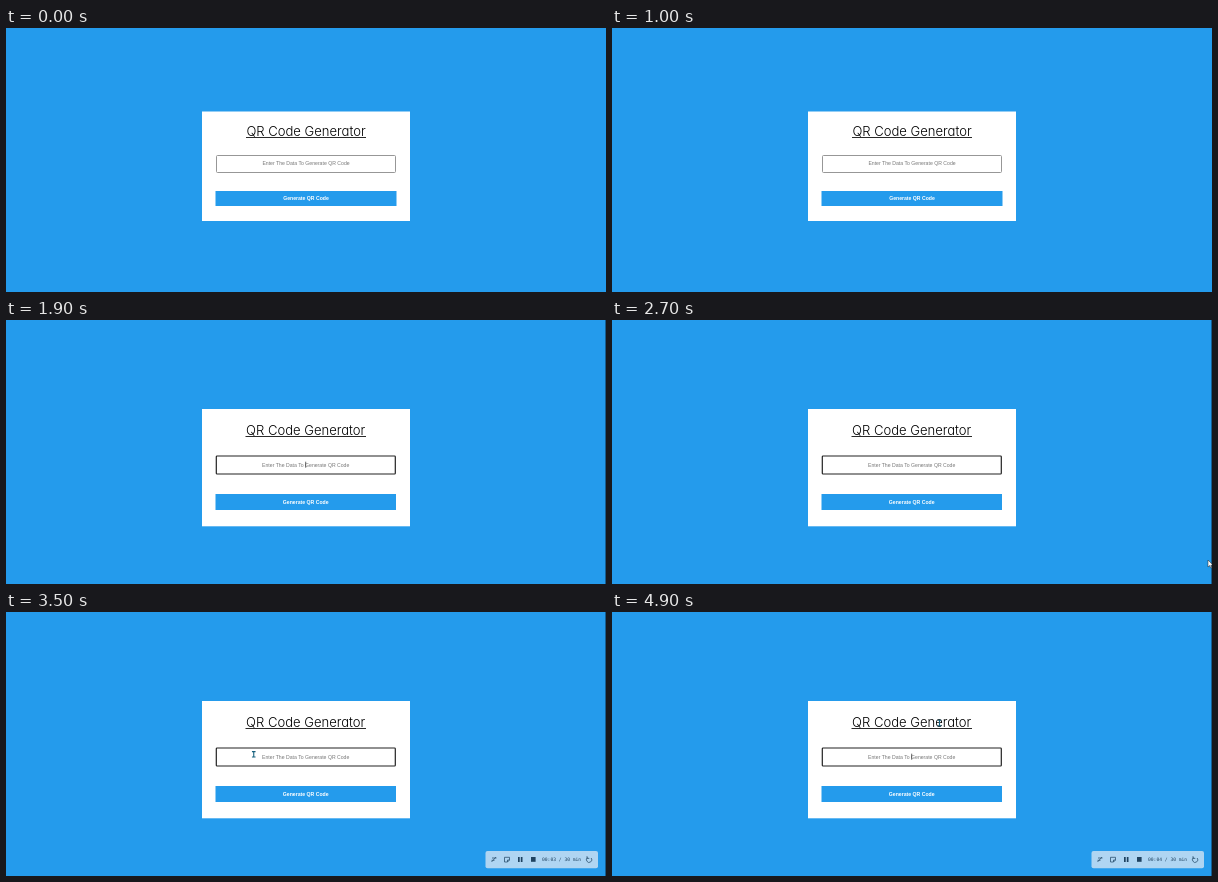
Write an HTML page that moves like this. It is 600 px wide and 264 px high and loops after 5000 ms.

```html
<!DOCTYPE html>
<html lang="en">
<head>
<meta charset="utf-8">
<title>QR Code Generator</title>
<style>
  html, body { margin: 0; width: 100%; height: 100%; overflow: hidden; background: #249bec; }
  svg { display: block; width: 600px; height: 264px; }
  text { text-anchor: middle; font: 5.15px "Liberation Sans", Arial, sans-serif; }
  .title { font: 300 13.05px Inter, sans-serif; font-feature-settings: "cv11"; }
  .hint { fill: #777; }
  .label { fill: #fff; font-weight: bold; }
  .clock { font: 4.65px "DejaVu Sans Mono", monospace; fill: #1f4260; }
  .icon { fill: none; stroke: #2d5270; stroke-width: .8; }
  .solid { fill: #1f4260; }
</style>
</head>
<body>
<svg viewBox="0 0 600 264">
  <rect width="600" height="264" fill="#249bec"/>

  <g id="idle">
    <rect x="196" y="83.5" width="208" height="109.5" fill="#fff"/>
    <text class="title" x="300" y="108">QR Code Generator</text>
    <path d="M240 109.5H360" stroke="#111" stroke-width=".9"/>
    <rect x="210.5" y="127.5" width="179" height="17" rx="1" fill="#fff" stroke="#8c8c8c" stroke-width=".9"/>
    <text class="hint" x="300" y="137.4">Enter The Data To Generate QR Code</text>
    <rect x="209.5" y="163" width="181" height="15" fill="#249bec"/>
    <text class="label" x="300" y="172">Generate QR Code</text>
  </g>

  <g id="focused">
    <rect x="196" y="89" width="208" height="117.3" fill="#fff"/>
    <text class="title" x="299.7" y="115">QR Code Generator</text>
    <path d="M239.5 116.5H360" stroke="#111" stroke-width=".9"/>
    <rect x="210.3" y="136" width="179" height="18" rx=".8" fill="#fff" stroke="#222" stroke-width="1.2"/>
    <text class="hint" x="299.7" y="146.7">Enter The Data To Generate QR Code</text>
    <path id="caret" d="M299.7 141.7V147.7" stroke="#222" stroke-width=".7"/>
    <rect x="209.5" y="174" width="180.5" height="16" fill="#249bec"/>
    <text class="label" x="299.7" y="183.7">Generate QR Code</text>
    <path d="M599.6 0V264" stroke="#12476e" stroke-width=".8"/>
  </g>

  <g id="recorder">
    <rect x="479.5" y="239" width="112.5" height="17.2" rx="2" fill="#afd5f2"/>
    <path class="icon" d="M485.5 250L490 245M486 246H490.5M485.5 248.3H488.5"/>
    <path class="icon" d="M498.5 245.3H503.5V248L501.5 250H498.5ZM501.5 250V248H503.5"/>
    <path class="solid" d="M512 245h1.7v5H512ZM514.8 245h1.7v5h-1.7Z"/>
    <rect class="solid" x="525" y="245" width="4.6" height="4.8"/>
    <text id="clock" class="clock" x="555.6" y="249.3"></text>
    <path class="icon" d="M581.7 245.4A2.7 2.7 0 1 0 585.2 246M581 244.2V246.4H583.3"/>
  </g>

  <g id="pointer">
    <path id="beam" d="M-1.8 -2.7H1.8M0 -2.7V2.7M-1.8 2.7H1.8" fill="none" stroke="#17617e" stroke-width="1.1"/>
    <path id="arrow" d="M0 0V7L1.7 5.5L2.8 8L3.8 7.5L2.8 5.2H5Z" fill="#fff" stroke="#222" stroke-width=".5"/>
  </g>
</svg>
<script>
const LOOP = 5000, STEP = 100;
const el = id => document.getElementById(id);
const show = (id, on) => el(id).style.display = on ? "" : "none";

// Pointer path: [ms, x, y]
const path = [
  [2700, 596, 240], [3000, 400, 172], [3300, 251.5, 139], [3700, 244, 145.7],
  [4000, 244, 145.7], [4400, 415, -12], [4700, 415, -12], [4800, 412, 2], [4900, 327.5, 111]
];

function pointerAt(t) {
  const i = path.findIndex(p => p[0] > t);
  if (i === 0) return null;
  if (i < 0) return path[path.length - 1].slice(1);
  const [t0, x0, y0] = path[i - 1], [t1, x1, y1] = path[i];
  const k = (t - t0) / (t1 - t0), e = k * k * (3 - 2 * k);
  return [x0 + (x1 - x0) * e, y0 + (y1 - y0) * e];
}

const inside = (x, y, l, t, r, b) => x > l && x < r && y > t && y < b;

function draw(now) {
  const t = Math.floor(now % LOOP / STEP) * STEP;
  const focused = t >= 1900;
  show("idle", !focused);
  show("focused", focused);
  show("caret", (t + 200) % 1000 < 550);
  show("recorder", t >= 3500);
  el("clock").textContent = `00:0${t < 4300 ? 3 : 4} / 30 min`;

  const pos = pointerAt(t);
  show("pointer", pos);
  if (pos) {
    const [x, y] = pos;
    const overText = inside(x, y, 210, 136, 390, 154) || inside(x, y, 239, 103, 361, 119);
    el("pointer").setAttribute("transform", `translate(${x} ${y})`);
    show("beam", overText);
    show("arrow", !overText);
  }
  requestAnimationFrame(draw);
}

requestAnimationFrame(draw);
</script>
</body>
</html>
```
